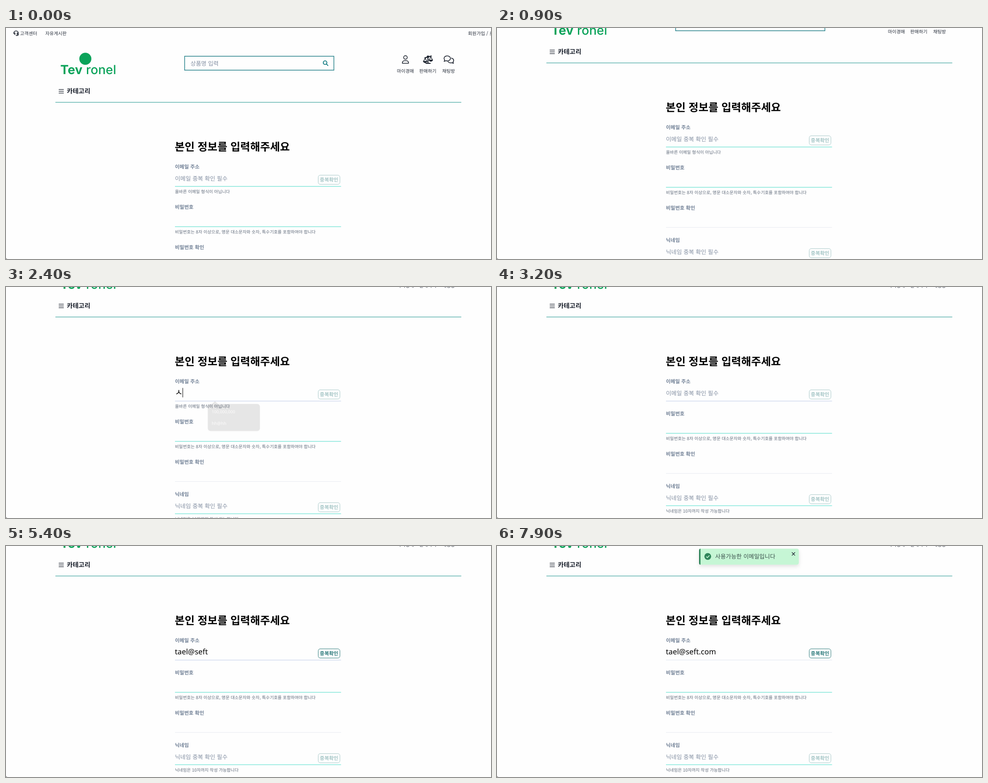
An HTML page for the animation above (8 s loop, 1085 by 516 pixels).

```html
<!DOCTYPE html>
<html lang="ko">
<head>
<meta charset="utf-8">
<title>회원가입</title>
<style>
html, body { margin: 0; width: 100%; height: 100%; overflow: hidden; background: #fefefe; }
svg { display: block; }
text { font-family: "Noto Sans CJK KR", "Noto Sans CJK", "Noto Sans", sans-serif; text-rendering: geometricPrecision; white-space: pre; }
.nav { font-size: 10.35px; fill: #262d3a; }
.title { font-size: 24.12px; font-weight: 700; fill: #000; }
.label { font-size: 11.25px; font-weight: 600; fill: #718096; }
.hint { font-size: 12.9px; fill: #8490a3; }
.help { font-size: 9.61px; fill: #606b7b; }
.latin { font-family: "Noto Sans", "Noto Sans CJK KR", sans-serif; }
.brand { font-family: Inter, sans-serif; font-size: 28px; fill: #0ba35a; }
.menu { font-size: 14.3px; font-weight: 600; fill: #1a202c; }
.rule { stroke: #81e6d9; stroke-width: 1.5; }
.faint { stroke: #e6eaf0; stroke-width: 1; }
.icon { fill: none; stroke: #1a202c; stroke-width: 1.6; stroke-linecap: round; stroke-linejoin: round; }
.thin { stroke-width: 1.3; }
.check rect { fill: none; stroke: #2c7a7b; }
.check text { font-size: 11.2px; font-weight: 600; fill: #2c7a7b; text-anchor: middle; }
</style>
</head>
<body>
<svg width="1085" height="516" viewBox="0 0 1085 516">
  <defs>
    <filter id="soft" x="-20%" y="-60%" width="140%" height="260%">
      <feDropShadow dx="0" dy="4" stdDeviation="4.5" flood-color="#000" flood-opacity=".11"/>
    </filter>
    <filter id="drop" x="-10%" y="-10%" width="120%" height="125%">
      <feDropShadow dx="0" dy="1" stdDeviation="1" flood-color="#000" flood-opacity=".3"/>
    </filter>
    <g id="check" class="check">
      <rect x="698.5" y="328.8" width="48.5" height="20.4" rx="4.5"/>
      <text x="722.7" y="343.2">중복확인</text>
    </g>
  </defs>

  <g id="page">
    <g class="icon">
      <path d="M17.3 12.5V11.5a5.2 5 0 0 1 10.4 0V14a2.6 2.6 0 0 1-2.6 2.6H22.5"/>
      <path d="M19.7 11v3.2M25.3 11v3.2" stroke-width="2.2"/>
    </g>
    <g class="nav">
      <text x="31.6" y="16.4">고객센터</text>
      <text x="88" y="16.4">자유게시판</text>
      <text x="1033.6" y="16.4">회원가입 / 로그인</text>
      <text x="874.5" y="99.6">마이경매</text>
      <text x="924.6" y="99.6">판매하기</text>
      <text x="975.8" y="99.6">채팅방</text>
    </g>

    <circle cx="177.5" cy="68.8" r="13.5" fill="#0ba35a"/>
    <text class="brand" x="121.5" y="102.5" font-weight="700">Tev</text>
    <text class="brand" x="179" y="102.5" font-weight="500">ronel</text>

    <rect x="399.6" y="63.1" width="333.9" height="31.1" fill="none" stroke="#26828a" stroke-width="1.5"/>
    <text class="hint" x="412.8" y="83.8">상품명 입력</text>
    <g fill="none" stroke="#127c83" stroke-width="1.9" stroke-linecap="round">
      <circle cx="713.8" cy="77.4" r="4"/>
      <path d="M717 80.6l3.2 3.2"/>
    </g>

    <g class="icon">
      <circle cx="893.6" cy="65.8" r="4"/>
      <path d="M886.6 78.8c0-3.6 2.2-5.8 5.4-5.8h3.2c3.2 0 5.4 2.2 5.4 5.8z"/>
      <path d="M944 64V79M939.5 79H949M937 66.6L951.5 62.6" stroke-width="2.2"/>
      <path d="M934.2 74l3.6-6.4 3.6 6.4M946.8 71l3.6-6.4 3.6 6.4" stroke-width="1.4"/>
      <path d="M933.6 74.2h8.4a4.2 3.2 0 0 1-8.4 0zM946.2 71.2h8.4a4.2 3.2 0 0 1-8.4 0z" fill="#1a202c" stroke-width="1"/>
      <circle cx="944" cy="64" r="1.8" fill="#1a202c"/>
      <path d="M980 74.4c1.1-1 1.5-2 1.4-3-3.4-4.6.2-9.2 5.6-9.2 4.2 0 7.2 2.6 7.2 5.7s-3 5.7-7.2 5.7c-1.1 0-2.1-.2-3-.5-1.2.8-2.5 1.3-4 1.3z"/>
      <path d="M996.2 67.3c5 .6 6.9 5.3 3.8 8.7 0 1 .4 1.8 1.3 2.7-1.5 0-2.8-.4-3.9-1.2-3.6 1.1-7.4-.1-8.6-2.5"/>
    </g>

    <path class="icon thin" d="M118.4 137.3H128.8M118.4 141.3H128.8M118.4 145.3H128.8"/>
    <text class="menu" x="136" y="146.4">카테고리</text>
    <path d="M110.5 166H1018.5" stroke="#5fb3af" stroke-width="1.5"/>

    <text class="title" x="377.5" y="274">본인 정보를 입력해주세요</text>
    <text class="label" x="378" y="313.8">이메일 주소</text>
    <text class="hint" id="hint" x="378" y="341.4">이메일 중복 확인 필수</text>
    <text class="latin" id="mail" x="377.8" y="341.2"></text>
    <rect id="caret" y="324.5" width="1" height="21" fill="#000"/>
    <use href="#check" id="verify"/>
    <path class="rule" id="line" d="M378 353.8H749.5"/>
    <text class="help" id="error" x="378" y="369.4">올바른 이메일 형식이 아닙니다</text>

    <g id="rest">
      <text class="label" x="378" y="404.1">비밀번호</text>
      <path class="rule" d="M378 443.8H749.5"/>
      <text class="help" x="378" y="459.2">비밀번호는 8자 이상으로, 영문 대소문자와 숫자, 특수기호를 포함하여야 합니다</text>
      <text class="label" x="378" y="494.1">비밀번호 확인</text>
      <path class="faint" d="M378 533.4H749.5"/>
      <text class="label" x="378" y="565.9">닉네임</text>
      <text class="hint" x="378" y="593">닉네임 중복 확인 필수</text>
      <use href="#check" y="252" opacity=".42"/>
      <path class="rule" d="M378 605.6H749.5"/>
      <text class="help" x="378" y="621.1">닉네임은 10자까지 작성 가능합니다</text>
    </g>
  </g>

  <g id="popup">
    <path d="M457.5 261.3H460.8L467.5 255.2L474.2 261.3H562a6 6 0 0 1 6 6V315.5a6 6 0 0 1-6 6H457.5a6 6 0 0 1-6-6V267.3a6 6 0 0 1 6-6z" fill="#231a1c" filter="url(#drop)"/>
    <g fill="#f1eef0">
      <text class="latin" x="460.3" y="281.6" font-size="9.2">100,000,000</text>
      <text class="latin" x="460.3" y="308.3" font-size="9.7">hh@hh</text>
    </g>
  </g>

  <g id="toast">
    <g filter="url(#soft)">
      <rect x="452" y="6" width="223.3" height="35.8" rx="4.5" fill="#c6f6d5"/>
    </g>
    <path d="M455.2 6V41.8a3.2 4.5 0 0 1-3.2-4.5V10.5a3.2 4.5 0 0 1 3.2-4.5z" fill="#2f855a"/>
    <circle cx="471.5" cy="23.3" r="7.6" fill="#2f855a"/>
    <path d="M468 23.5l2.6 2.6 4.6-5" fill="none" stroke="#c6f6d5" stroke-width="1.6"/>
    <text x="488" y="27.9" font-size="12.95" fill="#3a4f4b">사용가능한 이메일입니다</text>
    <path class="icon thin" d="M660 14.5l6.4 6.4M666.4 14.5l-6.4 6.4"/>
  </g>

  <path d="M0 512.5Q.3 515.7 4 516H0z" fill="#8a8a8a"/>
</svg>
<script>
const LOOP = 8000, STEP = 100;
const el = id => document.getElementById(id);
const [page, hint, mail, caret, verify, line, error, rest, popup, toast] =
  ['page', 'hint', 'mail', 'caret', 'verify', 'line', 'error', 'rest', 'popup', 'toast'].map(el);

// Each entry holds its value from the given time on.
const scroll = [[0, 0], [500, 28], [600, 49.5], [800, 64], [900, 88], [1000, 99]];
const popupAlpha = [[0, 0], [1600, .5], [1700, 1], [2200, .7], [2300, .35], [2400, .1], [2500, 0]];
const toastIn = [[0, 0], [7700, .4], [7800, .85], [7900, 1]];
const address = 'tael@seft.com';
const typed = [[0, ''], [2200, 'ㅅ'], [2800, 'ㅅㅁㄷ'], [3000, ''],
  ...[[3500, 1], [3600, 2], [3700, 3], [3900, 4], [4200, 5], [4600, 6], [4700, 7], [4900, 9],
    [6000, 10], [6100, 11], [6200, 12], [6300, 13]].map(([t, n]) => [t, address.slice(0, n)])];
const caretFlips = [1500, 2000, 2200, 3200, 3500, 5400, 5900, 6800, 7300, 7500];

const at = (list, t) => list.filter(([start]) => start <= t).pop()[1];
const show = (node, alpha) => node.setAttribute('opacity', Number(alpha));
const move = (node, y) => node.setAttribute('transform', `translate(0 ${y})`);

function draw(time) {
  const t = Math.floor(time / STEP) * STEP;
  const text = at(typed, t);
  const valid = /^\w+@\w+(\.\w+)?$/.test(text);
  const failed = t < 3000 || (text !== '' && !valid);
  const focused = t >= 1500 && t < 7500;

  move(page, -at(scroll, t));
  move(rest, failed ? 0 : -18);
  show(error, failed);
  show(hint, text === '');
  show(verify, valid ? 1 : .42);

  mail.textContent = text;
  mail.style.fontSize = /[ㄱ-ㅎ]/.test(text) ? '19px' : '16.8px';
  caret.setAttribute('x', Math.floor(378 + (text ? mail.getComputedTextLength() : 0)));
  show(caret, caretFlips.filter(f => f <= t).length % 2);

  line.style.stroke = t < 1500 ? '#81e6d9' : focused ? '#d3dbef' : '#dce3ee';
  line.style.strokeWidth = focused || t < 1500 ? 1.5 : 1.1;

  show(popup, at(popupAlpha, t));
  const k = at(toastIn, t);
  show(toast, k);
  move(toast, (k - 1) * 24);
}

function tick() {
  draw(performance.now() % LOOP);
  requestAnimationFrame(tick);
}
tick();
</script>
</body>
</html>
```
